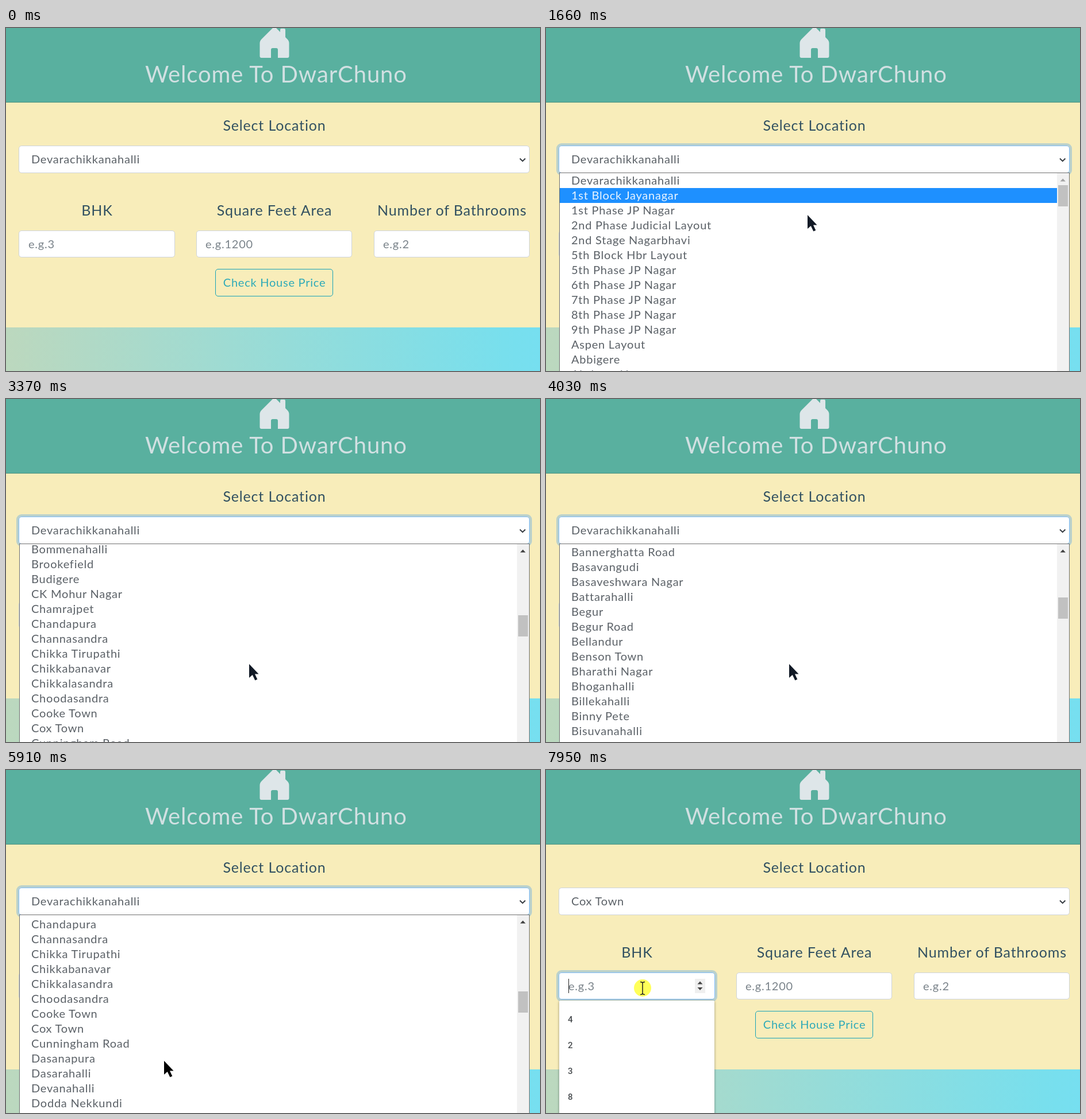
These frames come from a looping animation (929x598 px, 8 s). An HTML page:

```html
<!DOCTYPE html>
<html lang="en">
<head>
<meta charset="utf-8">
<title>House price form</title>
<style>
html, body { margin: 0; width: 100%; height: 100%; overflow: hidden; }
svg { display: block; width: 929px; height: 598px; }
text { font: 20px Lato, "Open Sans", sans-serif; letter-spacing: .038em; fill: #495057; fill-opacity: .9; }
.title { font-size: 40px; letter-spacing: .022em; fill: #dee6e9; }
.label { font-size: 25px; letter-spacing: .034em; text-anchor: middle; fill: #1c3f58; }
.hint { fill: #6c757d; }
.button { fill: #17a2b8; text-anchor: middle; }
.past { font: 500 15px Roboto, sans-serif; fill: #33373b; }
.field { fill: #fff; stroke: #ced4da; }
.ring { fill: none; stroke: #007bff; stroke-opacity: .25; stroke-width: 4; }
</style>
</head>
<body>
<svg viewBox="0 0 929 598">
  <defs>
    <linearGradient id="sky"><stop stop-color="#bcd8be"/><stop offset=".93" stop-color="#78dfed"/><stop offset="1" stop-color="#76dff0"/></linearGradient>
    <filter id="shadow" x="-10%" y="-10%" width="120%" height="120%"><feDropShadow dx="0" dy="1" stdDeviation="2" flood-opacity=".4"/></filter>
    <clipPath id="listClip"><rect x="24" y="253" width="866" height="345"/></clipPath>
  </defs>

  <rect width="929" height="598" fill="#f8edba"/>
  <rect width="929" height="130" fill="#59b09f"/>
  <rect y="129" width="929" height="1" fill="#4a9080"/>
  <rect y="522" width="929" height="76" fill="url(#sky)"/>
  <path fill="#dee6e9" d="M441.500 27Q441.500 22 445 19L463 1Q467-3 471 1L477 7V3Q477 1 479 1H484Q486 1 486 3V16L489 19Q492.500 22 492.500 27V49Q492.500 52 489.500 52H473V38Q473 35 470 35H464Q461 35 461 38V52H444.500Q441.500 52 441.500 49Z"/>
  <text class="title" x="242" y="95">Welcome To DwarChuno</text>

  <text class="label" x="467" y="179">Select Location</text>
  <text class="label" x="158.500" y="327">BHK</text>
  <text class="label" x="467" y="327">Square Feet Area</text>
  <text class="label" x="776" y="327">Number of Bathrooms</text>

  <rect id="select" class="field" x="22.500" y="205.500" width="888" height="47" rx="4.500"/>
  <rect id="selectRing" class="ring" x="20" y="203" width="893" height="52" rx="7"/>
  <text id="chosen" x="44" y="236"></text>
  <path d="M894 227.500l4.700 4.700 4.700-4.700" fill="none" stroke="#343a40" stroke-width="2"/>

  <rect id="bhk" class="field" x="22.500" y="353.500" width="271" height="46" rx="4.500"/>
  <rect class="field" x="331.500" y="353.500" width="270" height="46" rx="4.500"/>
  <rect class="field" x="640.500" y="353.500" width="270" height="46" rx="4.500"/>
  <text class="hint" x="39" y="384">e.g.3</text>
  <text class="hint" x="347" y="384">e.g.1200</text>
  <text class="hint" x="656" y="384">e.g.2</text>
  <rect x="364.500" y="420.500" width="204" height="47" rx="4.500" fill="none" stroke="#17a2b8"/>
  <text class="button" x="467" y="451">Check House Price</text>

  <g id="history">
    <rect class="ring" x="20" y="351" width="276" height="51" rx="7"/>
    <path d="M39.500 364v25" stroke="#222"/>
    <rect x="259" y="364" width="18" height="25" fill="#efefef"/>
    <path d="M263.500 373.500l4.500-5 4.500 5zM263.500 379l4.500 5 4.500-5z" fill="#444"/>
    <rect x="23" y="402" width="270" height="210" rx="2" fill="#fff" filter="url(#shadow)"/>
  </g>

  <g id="popup">
    <rect x="23.500" y="252.500" width="887" height="360" fill="#fff" stroke="#707070"/>
    <g clip-path="url(#listClip)">
      <rect id="hover" x="24" width="865" height="26" fill="#1e90ff"/>
      <g id="items"></g>
    </g>
    <rect x="889" y="253" width="21" height="345" fill="#f1f1f1"/>
    <path id="upArrow" d="M894.500 267.500l4.700-5 4.700 5z"/>
    <rect id="thumb" x="891" width="17" height="37" fill="#c1c1c1"/>
  </g>

  <circle id="click" r="15" fill="#ffff3c" fill-opacity=".85"/>
  <path id="arrow" d="M0 0V24L5.800 19 10.300 28.500 14.300 26.800 10 17.500H16.500Z" stroke="#fff" stroke-width="2" paint-order="stroke"/>
  <path id="beam" d="M-4-10.500Q0-10.500 0-8Q0-10.500 4-10.500M0-8V9M-4 11.500Q0 11.500 0 9Q0 11.500 4 11.500" fill="none" stroke="#222" stroke-width="1.500"/>
</svg>
<script>
const LOOP = 8000, ROW = 26, TOP = 253, COX_TOWN = 66;
const $ = id => document.getElementById(id);
const show = (id, on) => $(id).setAttribute('visibility', on ? 'visible' : 'hidden');
const place = (id, x, y) => $(id).setAttribute('transform', `translate(${x} ${y})`);

const names = `Devarachikkanahalli,1st Block Jayanagar,1st Phase JP Nagar,2nd Phase Judicial Layout,
2nd Stage Nagarbhavi,5th Block Hbr Layout,5th Phase JP Nagar,6th Phase JP Nagar,7th Phase JP Nagar,
8th Phase JP Nagar,9th Phase JP Nagar,Aspen Layout,Abbigere,Akshaya Nagar,Ambalipura,Amaravi Nagar,
Amruthahalli,Anandapura,Ananth Nagar,Anekal,Anjanapura,Ardendale,Arekere,Attibele,Birch Layout,
BTM 2nd Stage,BTM Layout,Babusapalaya,Badavala Nagar,Balagere,Banashankari,Banashankari Stage II,
Banashankari Stage III,Banashankari Stage V,Banashankari Stage VI,Banaswadi,Banjara Layout,Bannerghatta,
Bannerghatta Road,Basavangudi,Basaveshwara Nagar,Battarahalli,Begur,Begur Road,Bellandur,Benson Town,
Bharathi Nagar,Bhoganhalli,Billekahalli,Binny Pete,Bisuvanahalli,Bommanahalli,Bommasandra,
Bommasandra Industrial Area,Bommenahalli,Brookefield,Budigere,CK Mohur Nagar,Chamrajpet,Chandapura,
Channasandra,Chikka Tirupathi,Chikkabanavar,Chikkalasandra,Choodasandra,Cooke Town,Cox Town,
Cunningham Road,Dasanapura,Dasarahalli,Devanahalli,Dodda Nekkundi,Doddaballapur`.split(',').map(s => s.trim());

$('items').innerHTML = names.map((name, i) => `<text x="44" y="${TOP + 20 + i * ROW}">${name}</text>`).join('');
const rows = [...$('items').children];
$('history').insertAdjacentHTML('beforeend',
  ['4', '2', '3', '8'].map((n, i) => `<text class="past" x="38" y="${440 + i * 45}">${n}</text>`).join(''));

// Each move: first step time, last step time, number of steps, end value.
function track(t, start, moves) {
  let value = start;
  for (const [from, to, count, end] of moves) {
    if (t < from) break;
    const step = Math.floor((t - from) / ((to - from) || 1) * (count - 1) + 1e-6);
    const p = Math.min(count, 1 + step) / count;
    value = value.map((v, i) => v + (end[i] - v) * p);
  }
  return value;
}

const pointerMoves = [
  [250, 790, 9, [460, 239]],
  [1660, 1660, 1, [455, 326]],
  [1750, 1880, 3, [423, 462]],
  [4420, 4900, 7, [282, 374]],
  [4970, 4970, 1, [279, 372]],
  [5040, 5180, 3, [275, 507]],
  [6170, 6570, 7, [254, 447]],
  [7350, 7550, 4, [168, 380]]
];
const scrollMoves = [
  [2210, 2410, 4, [799]],
  [2480, 2550, 2, [1000]],
  [2940, 3370, 7, [1408]],
  [3560, 4030, 8, [987]],
  [5710, 5910, 4, [1531]]
];
const hoverMoves = [
  [1660, 1660, 1, [1]],
  [1750, 1880, 3, [8]],
  [4420, 4420, 1, [46]],
  [4500, 4900, 6, [43]],
  [4970, 4970, 1, [42]],
  [5040, 5180, 3, [47]],
  [6170, 6170, 1, [68]],
  [6240, 6570, 6, [COX_TOWN]]
];
const clicks = [[1060, 1200, 461, 237], [7030, 7160, 254, 447], [7880, LOOP, 168, 380]];

function draw(t) {
  const open = t >= 1200 && t < 7160;
  const selectFocus = t >= 1200 && t < 7950;
  const bhkFocus = t >= 7950;
  const [scroll] = track(t, [0], scrollMoves);
  const hovered = Math.round(track(t, [0], hoverMoves)[0]);

  show('popup', open);
  show('selectRing', selectFocus);
  show('history', bhkFocus);
  $('select').style.stroke = selectFocus ? '#80bdff' : '';
  $('bhk').style.stroke = bhkFocus ? '#80bdff' : '';
  $('chosen').textContent = names[t < 7160 ? 0 : COX_TOWN];

  place('items', 0, -scroll);
  $('hover').setAttribute('y', TOP + hovered * ROW - scroll);
  rows.forEach((row, i) => row.style.fill = i === hovered ? '#fff' : '');
  $('thumb').setAttribute('y', Math.round(274 + scroll * .0731));
  $('upArrow').setAttribute('fill', scroll ? '#404040' : '#a3a3a3');

  const [x, y] = track(t, [711, 454], pointerMoves);
  const inField = t > 7350 && y > 353 && y < 400;
  place('arrow', x, y);
  place('beam', x, y);
  show('arrow', t >= 250 && !inField);
  show('beam', inField);
  $('arrow').setAttribute('fill', t < 5240 ? '#121a26' : '#000');

  const click = clicks.find(([from, to]) => t >= from && t < to);
  show('click', click);
  if (click) place('click', click[2], click[3]);
}

const begin = performance.now();
function tick() {
  draw((performance.now() - begin) % LOOP);
  requestAnimationFrame(tick);
}
tick();
</script>
</body>
</html>
```
